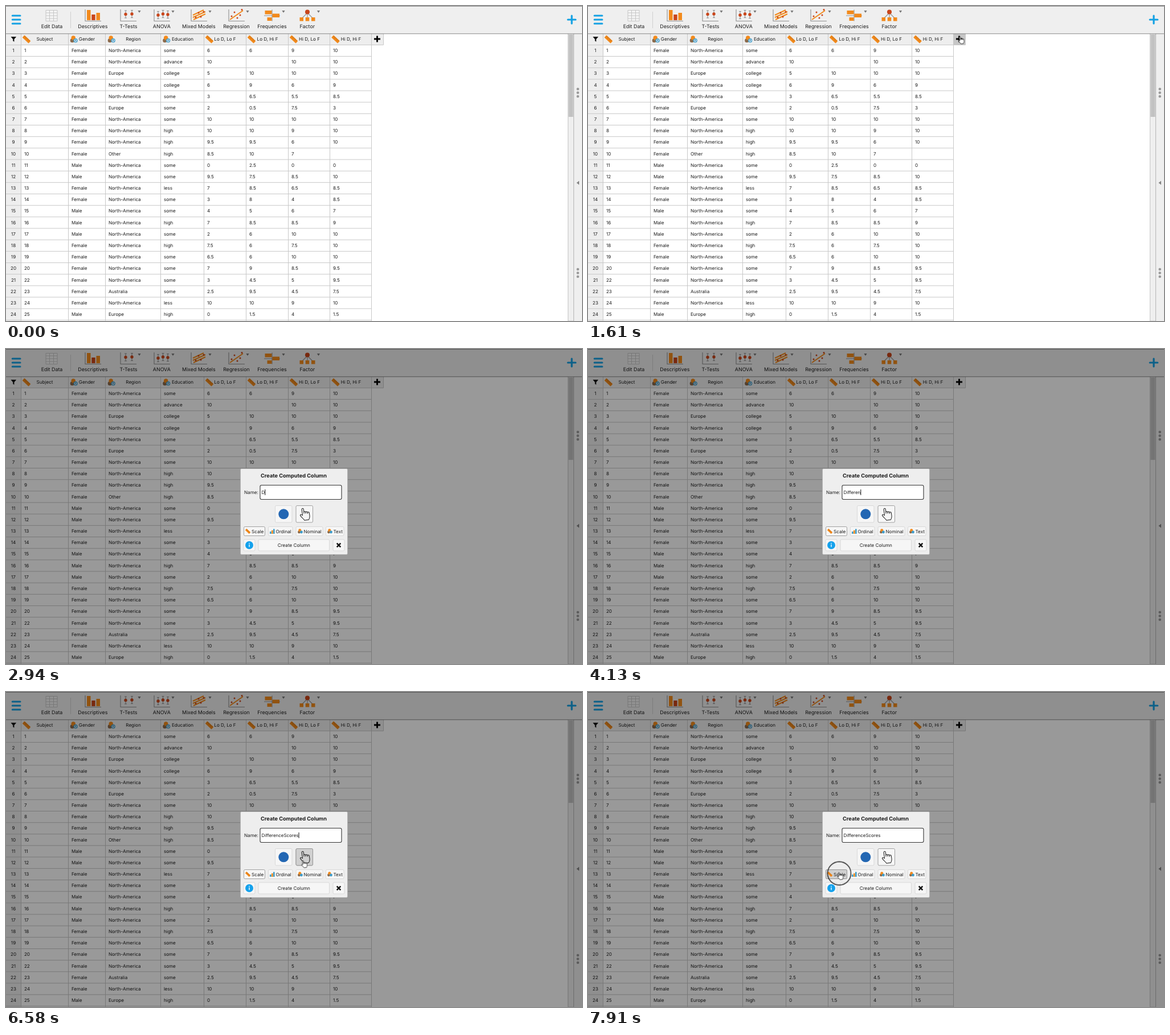
An HTML page for the animation above (8 s loop, 1011 px wide and 554 px high).

```html
<!DOCTYPE html>
<html lang="en">
<head>
<meta charset="utf-8">
<title>Create computed column</title>
<style>
  html, body { margin: 0; width: 100%; height: 100%; overflow: hidden; background: #fff; }
  svg { display: block; width: 100%; height: 100%; }
  text { font: 8.1px Inter, "Noto Sans", sans-serif; fill: #1c1c1c; text-rendering: geometricPrecision; white-space: pre; }
  .mid { text-anchor: middle; }
  .tool text { font-size: 8.9px; text-anchor: middle; }
  .axis { fill: none; stroke: #8f8f8f; stroke-width: 1.1; }
  .or { fill: #f28a1c; }
  .rd { fill: #c9451a; }
  .orl { fill: none; stroke: #f28a1c; stroke-width: 2; }
  .blue { fill: none; stroke: #14a1e3; stroke-width: 3.2; stroke-linecap: round; }
  .btn { fill: #f6f6f6; stroke: #d2d2d2; stroke-width: .8; }
  .on { stroke: #8c8c8c; }
  .hover { fill: #d0d0d0; stroke: #8c8c8c; stroke-width: .8; }
  .hand { fill: #fff; stroke: #111; stroke-width: 1.1; stroke-linejoin: round; }
  .icon { fill: none; stroke-width: .8; }

  .show { opacity: 0; animation: 8s step-end infinite; }
  #plusHover { animation-name: plusHover; }
  #modal { animation-name: modal; }
  #handHover { animation-name: handHover; }
  #scaleHover { animation-name: scaleHover; }
  #arrow { animation-name: arrow; }
  #finger { animation-name: finger; }
  #cursor { animation: move 8s ease-in-out infinite; }
  #ring { fill: none; stroke: #111; stroke-width: 1.3; opacity: 0; animation: ring 8s linear infinite; }

  @keyframes plusHover { 0%, 21% { opacity: 0 } 12.25% { opacity: 1 } }
  @keyframes modal { 0% { opacity: 0 } 21%, 100% { opacity: 1 } }
  @keyframes handHover { 0%, 92.75% { opacity: 0 } 80.5% { opacity: 1 } }
  @keyframes scaleHover { 0% { opacity: 0 } 96.25%, 100% { opacity: 1 } }
  @keyframes arrow {
    0%, 12.25%, 35.875%, 80.5% { opacity: 0 }
    5.25%, 21%, 76.125% { opacity: 1 }
  }
  @keyframes finger {
    0%, 21% { opacity: 0 }
    12.25%, 80.5%, 100% { opacity: 1 }
  }
  @keyframes move {
    0%, 5.25% { transform: translate(515px, 543px); animation-timing-function: ease-in }
    7.875% { transform: translate(606px, 320px); animation-timing-function: linear }
    10.5% { transform: translate(697px, 105px); animation-timing-function: ease-out }
    13.125%, 24.5% { transform: translate(652.5px, 54px) }
    28%, 76.125% { transform: translate(551px, 221px) }
    82.25%, 91.875% { transform: translate(521px, 296.5px) }
    97.125%, 100% { transform: translate(440.2px, 317.5px) }
  }
  @keyframes ring {
    0%, 15.7%, 20%, 83.95%, 88.4%, 97.1% { opacity: 0; transform: scale(.85) }
    15.75%, 84%, 97.125% { opacity: 1; transform: scale(.85) }
    17%, 18.8%, 85.25%, 87.1%, 98.375%, 100% { opacity: 1; transform: scale(1) }
  }
</style>
</head>
<body>
<svg viewBox="0 0 1011 554" preserveAspectRatio="none">
  <defs>
    <g id="ruler" transform="rotate(43)">
      <rect class="or" x="-7.5" y="-2.8" width="15" height="5.6" rx=".6"/>
      <path d="M-5-2.8v2.2M-2.5-2.8v3M0-2.8v2.2M2.5-2.8v3M5-2.8v2.2" stroke="#a4570c" stroke-width=".7"/>
    </g>
    <g id="nominal">
      <circle cx="-2.7" cy="2.2" r="3.6" fill="#8b6a4b"/>
      <circle class="or" cx="-.8" cy="-2.6" r="3.7"/>
      <circle cx="3.1" cy="2.2" r="3.6" fill="#3f9cc9"/>
    </g>
    <g id="nominalText">
      <use href="#nominal"/>
      <circle cx="3.2" cy="2.4" r="3" fill="#d9eef8" stroke="#3f9cc9"/>
      <path d="M1.9 4l1.3-3.3L4.5 4" fill="none" stroke="#1c74a8" stroke-width=".8"/>
    </g>
    <path id="handShape" d="M4.2 10.5V1.7a1.3 1.3 0 0 1 2.6 0V8V6.6a1.3 1.3 0 0 1 2.6 0V8.4V7.2a1.3 1.3 0 0 1 2.6 0V9V8a1.2 1.2 0 0 1 2.4 0V12.5c0 3-1.5 4-2 5.6H6c-1-2.2-3.5-4.6-5-7.4c-.7-1.4 1-2.2 2-1.2z"/>
    <path id="drop" d="M-2.6-2h5.2L0 2z" fill="#777"/>
    <path id="axes" class="axis" d="M0 6V26.5H28"/>
    <g id="point">
      <path class="axis" d="M0-6.5V6.5M-2-6.5h4M-2 6.5h4"/>
      <circle class="rd" r="2.7"/>
    </g>
  </defs>

  <rect width="1011" height="554" fill="#fff"/>
  <g id="sheet"></g>

  <g id="side">
    <rect x="986.5" y="48" width="10" height="506" fill="#efefef" stroke="#c4c4c4"/>
    <rect x="987.5" y="50" width="8" height="145" fill="#c2c2c2"/>
    <rect x="997" y="48" width="14" height="506" fill="#efefef"/>
    <path d="M996.5 48V554" stroke="#b4b4b4"/>
    <path d="M1006 307.5v7l-4.6-3.5z" fill="#858585"/>
  </g>

  <g class="tool">
    <rect width="1011" height="48" fill="#efefef"/>
    <path d="M0 .5H1011" stroke="#8d8d8d"/>
    <path d="M0 48.5H1011" stroke="#a4a4a4"/>
    <path d="M0 49.5H1011" stroke="#000" opacity=".12"/>
    <path d="M113.5 10V39" stroke="#cfcfcf"/>
    <path class="blue" d="M11.3 17h13.6M11.3 24h13.6M11.3 31h13.6M993 17.2v13.6M986.2 24h13.6"/>

    <path d="M70 7.5h20v19H70zM70 12h20M70 17h20M70 22h20M76.5 7.5v19M83.5 7.5v19" fill="#f4f4f4" stroke="#c6c6c6"/>
    <use href="#axes" x="139"/>
    <path class="or" d="M142 7h6.5v18H142zM158.5 12h6.5v13h-6.5z"/>
    <path class="rd" d="M150.3 15h6.3v10h-6.3z"/>
    <use href="#axes" x="201"/>
    <use href="#point" x="210" y="14.5"/><use href="#point" x="221" y="14"/>
    <use href="#axes" x="260"/>
    <use href="#point" x="267" y="16"/><use href="#point" x="275.5" y="14"/><use href="#point" x="284" y="15"/>
    <use href="#axes" x="325"/>
    <path class="orl" d="M328 16l19-9M328 20l22-10M329 24l21-10"/>
    <use href="#axes" x="391"/>
    <path class="orl" d="M393 24L416 8"/>
    <g id="dots" class="rd"></g>
    <path class="axis" d="M453 17h28M467 6.5v20"/>
    <path class="or" d="M454.5 8h12v6.5h-12zM467.5 13.5h12.5V20h-12.5zM458.5 20h8v6h-8z"/>
    <path class="axis" d="M529 12L519 22M529 12v10M529 12l10 10"/>
    <circle class="rd" cx="529" cy="10.5" r="4"/>
    <path class="or" d="M515.5 20h6.5v6.5h-6.5zM525.7 20h6.5v6.5h-6.5zM536 20h6.5v6.5H536z"/>
    <g id="labels"></g>
  </g>

  <g id="modal" class="show">
    <rect width="1011" height="554" fill="#000" opacity=".4"/>
    <rect x="411.5" y="210.5" width="188" height="151" rx="2" fill="#eee" stroke="#b0b0b0"/>
    <text class="mid" x="505" y="226" style="font-size:9.2px;font-weight:700">Create Computed Column</text>
    <text x="418" y="254.5">Name:</text>
    <rect x="446" y="239.5" width="143" height="25" rx="2.5" fill="#fff" stroke="#333" stroke-width="1.1"/>
    <text id="typed" x="448.5" y="254.8" style="font-size:7.95px"></text>
    <rect id="caret" y="247" width="1" height="10" fill="#111"/>

    <rect class="btn" x="472.5" y="275.5" width="29.5" height="29.5" rx="2"/>
    <circle cx="487.3" cy="290.3" r="9" fill="#2367b3"/>
    <rect class="btn on" x="509" y="275.5" width="29.5" height="29.5" rx="2"/>
    <rect id="handHover" class="show hover" x="509" y="275.5" width="29.5" height="29.5" rx="2"/>
    <use href="#handShape" class="hand icon" transform="translate(513.8 280.8) rotate(-8) scale(1.2)"/>

    <rect class="btn on" x="417.5" y="312.5" width="37" height="16" rx="2"/>
    <rect id="scaleHover" class="show hover" x="417.5" y="312.5" width="37" height="16" rx="2"/>
    <rect class="btn" x="460.5" y="312.5" width="42.5" height="16" rx="2"/>
    <rect class="btn" x="509" y="312.5" width="47" height="16" rx="2"/>
    <rect class="btn" x="561.5" y="312.5" width="31.5" height="16" rx="2"/>
    <use href="#ruler" transform="translate(424.5 320.5) scale(.65)"/>
    <path d="M463 321h2.6v4H463zM469 316.5h2.6v8.5H469z" fill="#3f9cc9"/>
    <path class="or" d="M466 318.8h2.6v6.2H466z"/>
    <use href="#nominal" transform="translate(516.3 320.5) scale(.68)"/>
    <use href="#nominal" transform="translate(568.3 320.5) scale(.68)"/>
    <text x="431" y="323.5">Scale</text>
    <text x="473.5" y="323.5">Ordinal</text>
    <text x="522.5" y="323.5">Nominal</text>
    <text x="574.5" y="323.5">Text</text>

    <rect class="btn" x="417" y="335" width="20" height="20" rx="2"/>
    <circle cx="427" cy="345" r="7" fill="#14a1ec"/>
    <path d="M427 343.8v4.4M427 341v1.5" stroke="#fff" stroke-width="1.4"/>
    <rect id="create" class="btn" x="443" y="335" width="124.5" height="20" rx="2"/>
    <text id="createText" class="mid" x="505.3" y="347.8">Create Column</text>
    <rect class="btn" x="574" y="335" width="20" height="20" rx="2"/>
    <path d="M580.7 341.7l6.6 6.6M587.3 341.7l-6.6 6.6" stroke="#111" stroke-width="2.5"/>
  </g>

  <g id="cursor">
    <circle id="ring" r="20.5" cx=".8" cy="1.5"/>
    <path id="arrow" class="show" d="M0 0V12.2L2.8 9.6L4.7 14L6.8 13.1L4.9 8.8H8.8z" fill="#111" stroke="#fff" stroke-width=".8"/>
    <g id="finger" class="show"><use href="#handShape" class="hand" transform="rotate(-8) scale(.72) translate(-5.5 -.4)"/></g>
  </g>
</svg>

<script>
  const $ = id => document.getElementById(id);
  const text = (x, y, s, cls = "") => `<text class="${cls}" x="${x}" y="${y}">${s}</text>`;
  const use = (id, x, y) => `<use href="#${id}" x="${x}" y="${y}"/>`;
  const dot = (x, y, r, fill) => `<circle cx="${x}" cy="${y}" r="${r}"${fill ? ` fill="${fill}"` : ""}/>`;

  const words = { F: "Female", M: "Male", N: "North-America", E: "Europe", O: "Other", A: "Australia", "-": "" };
  const rows = `F N some 6 6 9 10
F N advance 10 - 10 10
F E college 5 10 10 10
F N college 6 9 6 9
F N some 3 6.5 5.5 8.5
F E some 2 0.5 7.5 3
F N some 10 10 10 10
F N high 10 10 9 10
F N high 9.5 9.5 6 10
F O high 8.5 10 7 -
M N some 0 2.5 0 0
M N some 9.5 7.5 8.5 10
F N less 7 8.5 6.5 8.5
F N some 3 8 4 8.5
M N some 4 5 6 7
M N high 7 8.5 8.5 9
M N some 2 6 10 10
F N high 7.5 6 7.5 10
F N some 6.5 6 10 10
F N some 7 9 8.5 9.5
F N some 3 4.5 5 9.5
F A some 2.5 9.5 4.5 7.5
F N less 10 10 9 10
M E high 0 1.5 4 1.5`.split("\n").map(r => r.split(" "));

  // name, left edge, label centre, icon centre, icon
  const cols = [
    ["Subject", 26.5, 68, 36, "ruler"],
    ["Gender", 109.5, 142, 119, "nominalText"],
    ["Region", 174.5, 223.5, 185, "nominalText"],
    ["Education", 271.5, 310, 281.5, "nominalText"],
    ["Lo D, Lo F", 347.5, 384.5, 357, "ruler"],
    ["Lo D, Hi F", 421.5, 459, 431, "ruler"],
    ["Hi D, Lo F", 495.5, 532.5, 505, "ruler"],
    ["Hi D, Hi F", 568.5, 605.5, 578.5, "ruler"]
  ];

  function drawSheet() {
    const step = 20.17, right = 641.5;
    let out = `<rect y="48" width="662" height="20.5" fill="#eee"/><rect y="68" width="26.5" height="486" fill="#eee"/>
      <rect id="plusHover" class="show" x="642" y="48" width="20" height="20" fill="#c6c6c6"/>`;
    let lines = "M0 68.5H662.5V48";
    for (const x of [...cols.map(c => c[1]), right]) lines += `M${x} 48V554`;
    rows.forEach((_, i) => lines += `M0 ${88.5 + i * step}H${right}`);
    out += `<path d="${lines}" stroke="#c8c8c8" fill="none"/>`;
    out += `<path d="M8.5 54h9.6l-3.7 4.5v4.3l-2.2-1.3v-3z" fill="#111"/>
      <path d="M651.5 52.5v11M646 58h11" stroke="#000" stroke-width="2.8"/>`;
    for (const [name, , mid, icon, kind] of cols)
      out += `<use href="#${kind}" transform="translate(${icon} 58.5)"/>` + text(mid, 61.2, name, "mid");
    rows.forEach((row, i) => {
      const y = 81.1 + i * step, id = i < 20 ? i + 1 : i + 2;
      out += text(13, y, i + 1, "mid");
      [id, ...row].forEach((v, c) => out += text(cols[c][1] + 5.4, y, words[v] ?? v));
    });
    $("sheet").innerHTML = out;
  }

  function drawTools() {
    const names = { "Edit Data": 80.5, Descriptives: 152.3, "T-Tests": 215, ANOVA: 273.3, "Mixed Models": 338.3,
      Regression: 404.5, Frequencies: 467, Factor: 528.8 };
    $("labels").innerHTML = Object.entries(names).map(([n, x]) => text(x, 39, n)).join("")
      + [234, 293, 358, 424, 487, 548.5].map(x => use("drop", x, 10)).join("");
    const spots = [[333, 20], [338, 12], [342, 19], [347, 10], [396, 18], [401, 11], [406, 21], [411, 16], [414, 6.5]];
    $("dots").innerHTML = spots.map(([x, y]) => dot(x, y, 1.5)).join("");
    $("side").innerHTML += [146, 152.5, 159, 463, 469.5, 476].map(y => dot(1003.7, y, 2.3, "#999")).join("");
  }

  const word = "DifferenceScores";
  const keys = [2870, 3150, 3290, 3360, 3850, 3920, 4060, 4130, 4270, 4480, 4620, 4900, 5040, 5180, 5180, 5250];
  const caretOff = [[2170, 2660], [3640, 3850], [5670, 6160], [6650, 7140], [7630, 8000]];
  let start;

  function frame(now) {
    start ??= now;
    const t = (now - start) % 8000;
    const count = keys.filter(k => k <= t).length;
    const typed = $("typed");
    if (typed.textContent.length !== count) typed.textContent = word.slice(0, count);
    $("caret").setAttribute("x", 448.5 + (count ? typed.getComputedTextLength() : 0));
    $("caret").setAttribute("opacity", caretOff.some(([a, b]) => t >= a && t < b) ? 0 : 1);
    $("create").style.fill = count ? "" : "#dadada";
    $("createText").style.fill = count ? "" : "#aaa";
    requestAnimationFrame(frame);
  }

  drawSheet();
  drawTools();
  requestAnimationFrame(frame);
</script>
</body>
</html>
```
